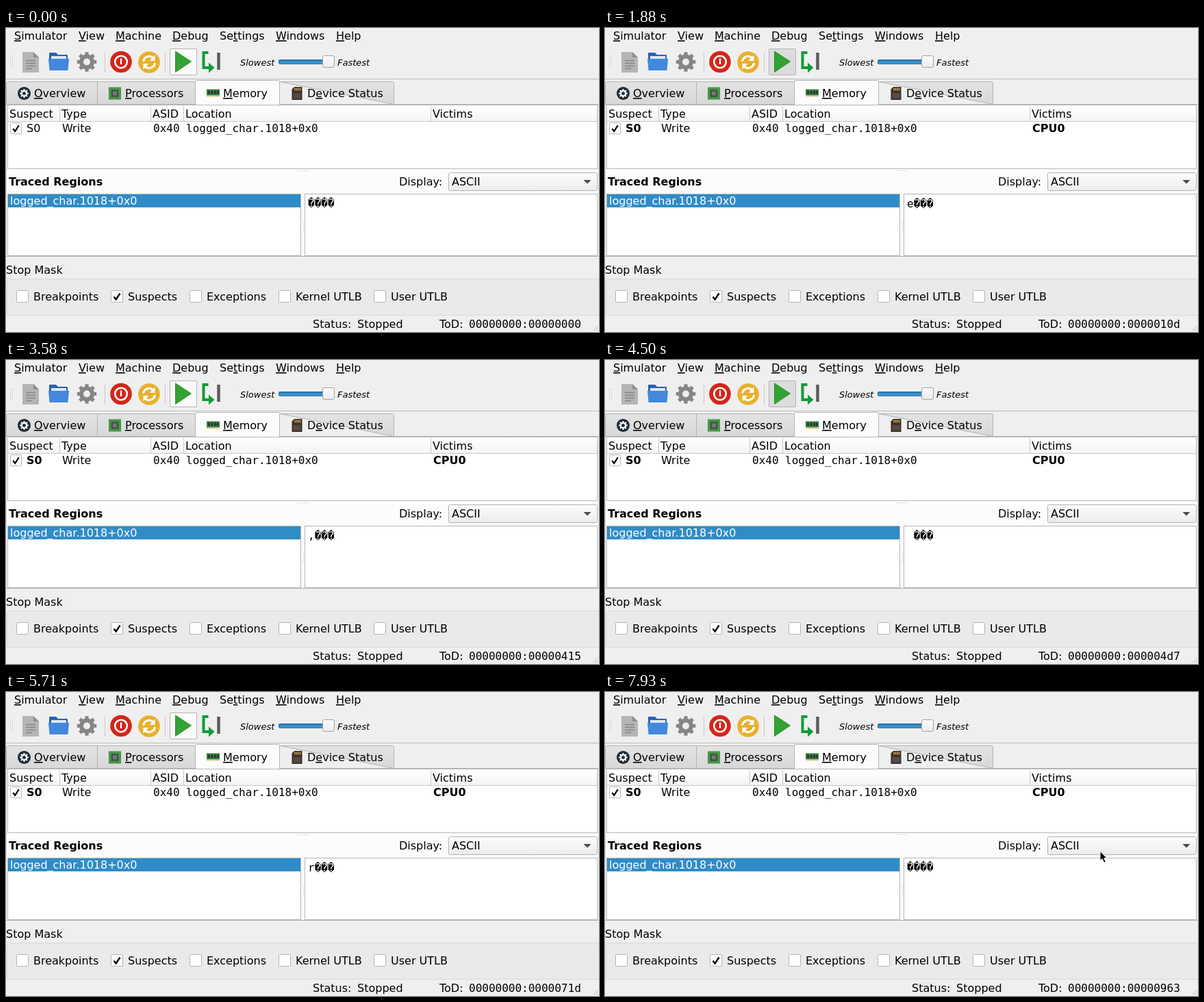
Animation of 866 by 444 pixels, one loop 7990 ms. Source, as an HTML page:

```html
<!DOCTYPE html>
<html lang="en">
<head>
<meta charset="utf-8">
<title>Memory trace</title>
<style>
html, body { margin: 0; width: 100%; height: 100%; overflow: hidden; background: #efefef; }
svg { display: block; width: 866px; height: 444px; }
text { font: 16px "DejaVu Sans", sans-serif; fill: #000; white-space: pre; }
.mono { font-family: "DejaVu Sans Mono", monospace; }
.bold { font-weight: bold; }
.small { font-size: 13px; font-style: oblique; }
.key { text-decoration: underline; text-decoration-skip-ink: none; }
.box { fill: #fff; stroke: #b6b6b6; }
.line { stroke: #c8c8c8; fill: none; }
</style>
</head>
<body>
<svg id="stage" viewBox="0 0 866 444">
  <defs>
    <linearGradient id="tab" x2="0" y2="1"><stop stop-color="#e3e3e3"/><stop offset="1" stop-color="#d8d8d8"/></linearGradient>
    <linearGradient id="head" x2="0" y2="1"><stop stop-color="#fff"/><stop offset="1" stop-color="#f4f4f4"/></linearGradient>
    <linearGradient id="combo" x2="0" y2="1"><stop stop-color="#fcfcfc"/><stop offset="1" stop-color="#ececec"/></linearGradient>
    <linearGradient id="groove" x2="0" y2="1"><stop stop-color="#2678b4"/><stop offset="1" stop-color="#45a3e0"/></linearGradient>
  </defs>
  <rect width="866" height="444" fill="#efefef"/>
  <path class="line" d="M0 74.5H866" style="stroke:#bcbcbc"/>
  <path class="line" d="M144.5 36V65M232.5 36V65"/>

  <!-- toolbar -->
  <g>
    <path d="M24 35H40L48 43V65H24Z" fill="#b5b5b5"/>
    <path d="M40 35V43H48Z" fill="#8f8f8f"/>
    <path d="M29 47.5H43M29 51.5H43M29 55.5H43M29 59.5H38" stroke="#858585" stroke-width="1.6"/>
  </g>
  <g>
    <path d="M63 37Q63 36 64 36H73L76 39H89Q90 39 90 40V46H63Z" fill="#2a62b0"/>
    <rect x="66" y="41" width="22" height="8" fill="#dce8f5"/>
    <path d="M62 45H92L90.500 62H63.500Z" fill="#4388dc"/>
  </g>
  <g id="gear" fill="none" stroke="#858585"></g>
  <g fill="none" stroke="#fff">
    <circle cx="168" cy="49.500" r="15.800" fill="#d3261a" stroke="none"/>
    <circle cx="168" cy="49.500" r="8.800" stroke-width="2.600"/>
    <path d="M168 44.500V53" stroke-width="2.400"/>
  </g>
  <g>
    <circle cx="209" cy="50" r="15.800" fill="#e9b02c"/>
    <path d="M200.500 49A8.500 8.500 0 0 1 214.500 43.500M217.500 51A8.500 8.500 0 0 1 203.500 56.500" fill="none" stroke="#fff" stroke-width="3"/>
    <path d="M217.500 39.500V48H209.500ZM200.500 60.500V52H208.500Z" fill="#fff"/>
  </g>
  <rect id="button" x="239.500" y="30.500" width="39" height="38" rx="1.500" stroke="#b4b4b4"/>
  <path d="M247.500 34L270.500 49L247.500 64.500Z" fill="#33a133" stroke="#2c922c" stroke-width="1"/>
  <g fill="none" stroke="#149b38">
    <path d="M295.500 36H288.500V58H297" stroke-width="4"/>
    <path d="M296 50.500L304.500 58L296 65.500Z" fill="#149b38" stroke="none"/>
    <path d="M310.500 36V61" stroke="#5c5c5c" stroke-width="4.500"/>
  </g>
  <text class="small" x="342" y="55">Slowest</text>
  <text class="small" x="484" y="55">Fastest</text>
  <rect x="398.500" y="46.500" width="72" height="6" rx="1.500" fill="url(#groove)" stroke="#276f9e"/>
  <rect x="462.500" y="40.500" width="17" height="17" rx="2.500" fill="url(#combo)" stroke="#a2a2a2"/>

  <!-- tabs -->
  <path d="M0 111.500H866V333.500H0Z" fill="#fcfcfc" stroke="#b4b4b4"/>
  <path d="M.5 111.500V80.500Q.5 78.500 2.500 78.500H276M133.500 78.500V111.500M400 78.500H564.500Q566.500 78.500 566.500 80.500V111.500Z" fill="url(#tab)" stroke="#b4b4b4"/>
  <path d="M1 111V79H276V111Z" fill="url(#tab)"/>
  <path d="M133.500 79V111M.5 111V80M0 111.500H276" stroke="#b4b4b4"/>
  <path d="M276.500 112V78.500Q276.500 76.500 278.500 76.500H397.500Q399.500 76.500 399.500 78.500V112" fill="#fcfcfc" stroke="#b4b4b4"/>
  <circle cx="26.500" cy="95.500" r="9.500" fill="#1e2a36"/>
  <g id="cog" fill="none" stroke="#fff"></g>
  <g>
    <rect x="150" y="86.500" width="18" height="18" fill="#3b8f3d"/>
    <rect x="151.500" y="88" width="15" height="15" fill="none" stroke="#74b765" stroke-dasharray="1.500 1.500"/>
    <rect x="154" y="90.500" width="10" height="10" fill="#4a4a4a"/>
    <rect x="156" y="92.500" width="6" height="6" fill="#767676"/>
  </g>
  <g>
    <rect x="293" y="89.500" width="19" height="9" fill="#36863f"/>
    <path d="M295 91.500H298V96.500H295ZM299.500 91.500H302.500V96.500H299.500ZM304 91.500H307V96.500H304ZM308 91.500H310.500V96.500H308Z" fill="#2b3438"/>
    <path d="M293.500 99.500H312" stroke="#d3ac3e" stroke-width="2" stroke-dasharray="1.500 1"/>
  </g>
  <g>
    <path d="M421 86H432.500V105H417.500V89.500Z" fill="#3b302b"/>
    <path d="M422 87.500V91.500M424.500 87.500V91.500M427 87.500V91.500M429.500 87.500V91.500" stroke="#d9ab49" stroke-width="1.400"/>
    <rect x="419.500" y="95" width="11" height="8" fill="#574a42"/>
  </g>

  <!-- tables -->
  <rect class="box" x="2.500" y="112.500" width="861" height="93"/>
  <rect x="3" y="113" width="860" height="23" fill="url(#head)"/>
  <path class="line" d="M3 136.500H863M78.500 114V136M211.500 114V136M259.500 114V136M620.500 114V136"/>
  <rect class="box" x="2.500" y="242.500" width="428" height="90"/>
  <rect class="box" x="436.500" y="242.500" width="427" height="90"/>
  <rect x="3" y="243" width="427" height="19" fill="#308cc6"/>
  <rect x="646.500" y="211.500" width="217" height="26" rx="2" fill="url(#combo)" stroke="#b2b2b2"/>
  <path d="M843.500 222H854.500L849 227.500Z" fill="#4a4a4a"/>

  <!-- stop mask -->
  <rect x="1.500" y="366.500" width="868" height="53" rx="2" fill="#eaeaea" stroke="#d9d9d9"/>
  <g id="labels"></g>
  <g id="checks"></g>
  <g id="dots" fill="#b5b5b5"></g>

  <text id="name" x="30" y="152">S0</text>
  <text id="victim" class="bold" x="624" y="152">CPU0</text>
  <text id="bytes" class="mono" x="441"></text>
  <text id="status" x="513" y="438"></text>
  <text id="tod" class="mono" x="676" y="438"></text>
  <path id="cursor" d="M.5 .5V14.500L3.700 11.600L6.200 17.300L8.800 16.200L6.300 10.700H10.700Z" fill="#000" stroke="#fff" stroke-width="1"/>
</svg>
<script>
const $ = id => document.getElementById(id);
const NS = "http://www.w3.org/2000/svg";

function add(parent, tag, attrs) {
  const el = document.createElementNS(NS, tag);
  for (const k in attrs) el.setAttribute(k, attrs[k]);
  return parent.appendChild(el);
}

// "&" marks the underlined letter
function label(x, y, str, cls = "", fill = "#000") {
  const el = add($("labels"), "text", { x, y, class: cls, style: "fill:" + fill });
  const at = str.indexOf("&");
  if (at < 0) { el.textContent = str; return; }
  el.append(str.slice(0, at));
  add(el, "tspan", { class: "key" }).textContent = str[at + 1];
  el.append(str.slice(at + 2));
}

function checkbox(x, y, size, on) {
  add($("checks"), "rect", { x: x + .5, y: y + .5, width: size - 1, height: size - 1, rx: 1, fill: "#fff", stroke: "#b4b4b4" });
  if (!on) return;
  const s = size / 18;
  add($("checks"), "path", {
    d: "M4.500 9.500L7.700 13.500L13.500 4.500", transform: `translate(${x} ${y}) scale(${s})`,
    fill: "none", stroke: "#000", "stroke-width": 2.4
  });
}

function gear(id, cx, cy, r, width, tooth) {
  const g = $(id);
  add(g, "circle", { cx, cy, r, "stroke-width": width });
  for (let i = 0; i < 8; i++)
    add(g, "path", {
      d: `M0 ${-r - width / 2 + .5}V${-r - width / 2 - tooth}`, "stroke-width": r * .65,
      transform: `translate(${cx} ${cy}) rotate(${i * 45})`
    });
}

function dots(x, y, cols, rows, step) {
  for (let i = 0; i < cols; i++)
    for (let j = 0; j < rows; j++)
      add($("dots"), "rect", { x: x + i * step, y: y + j * step, width: 1, height: 1 });
}

[[12, "&Simulator"], [106, "&View"], [160, "&Machine"], [243, "&Debug"],
 [312, "Se&ttings"], [394, "&Windows"], [482, "&Help"]].forEach(([x, s]) => label(x, 17, s));
[[41, "&Overview"], [174, "&Processors"], [317, "&Memory"], [440, "D&evice Status"]].forEach(([x, s]) => label(x, 101, s));
[[5, "Suspect"], [81, "Type"], [214, "ASID"], [262, "Location"], [623, "Victims"]].forEach(([x, s]) => label(x, 131, s));
label(82, 152, "Write");
label(215, 152, "0x40", "mono");
label(263, 152, "logged_char.1018+0x0", "mono");
label(4, 230, "Traced Regions", "bold");
label(574, 230, "Display:");
label(651, 230, "ASCII");
label(6, 258, "logged_char.1018+0x0", "", "#fff");
label(0, 359, "Stop Mask");
label(448, 438, "Status:");
label(633, 438, "ToD:");
[[15, "Breakpoints"], [153, "Suspects"], [268, "Exceptions"], [398, "Kernel UTLB"], [537, "User UTLB"]].forEach(([x, s]) => {
  checkbox(x, 383, 18, s === "Suspects");
  label(x + 25, 398, s);
});
checkbox(6, 138, 17, true);
gear("gear", 118, 49.5, 8, 6, 3.2);
gear("cog", 26.5, 95.5, 3.6, 2.2, 1.6);
dots(6, 41, 2, 6, 3);
dots(426, 208, 6, 1, 3);
dots(434, 281, 1, 6, 3);
for (let i = 0; i < 4; i++) dots(863 - i * 2, 435 + i * 2, i + 1, 1, 2);

const LOOP = 7990;
const MESSAGE = "Hello, world\uFFFD";
const PRESS = [730, 1300, 1880, 2370, 2900, 3420, 3950, 4500, 5040, 5540, 6090, 6630, 7170];
const STOP = [820, 1480, 2030, 2530, 3060, 3580, 4110, 4670, 5200, 5710, 6260, 6790, 7320];

function render(t) {
  const shown = STOP.filter(s => t >= s).length;
  const pressed = PRESS.filter(p => t >= p).length > shown;
  const running = pressed && shown > 0 && t >= STOP[shown] - 40;
  const hit = shown > 0 && !running;

  $("button").setAttribute("fill", pressed && !running ? "#dcdcdc" : "#fbfbfb");
  $("button").setAttribute("opacity", t < 7360 ? 1 : t < 7400 ? .5 : 0);
  $("name").setAttribute("class", hit ? "bold" : "");
  $("victim").setAttribute("visibility", hit ? "visible" : "hidden");
  $("status").textContent = running ? "Running" : "Stopped";

  const first = shown ? MESSAGE[shown - 1] : "\uFFFD";
  $("bytes").textContent = first + "\uFFFD".repeat(3);
  $("bytes").setAttribute("y", first === "\uFFFD" ? 261 : 262);
  const tod = shown ? 75 + 194 * (shown - 1) : 0;
  $("tod").textContent = "00000000:" + tod.toString(16).padStart(8, "0");

  // pointer moves in 40 ms steps
  const p = Math.min(4, Math.floor((t - 7770) / 40)) / 4;
  $("cursor").setAttribute("visibility", p >= 0 ? "visible" : "hidden");
  $("cursor").setAttribute("transform", `translate(${689 + 33.5 * p} ${199 + 33 * p})`);
}

const start = performance.now();
function tick() {
  render((performance.now() - start) % LOOP);
  requestAnimationFrame(tick);
}
render(0);
requestAnimationFrame(tick);
</script>
</body>
</html>
```
